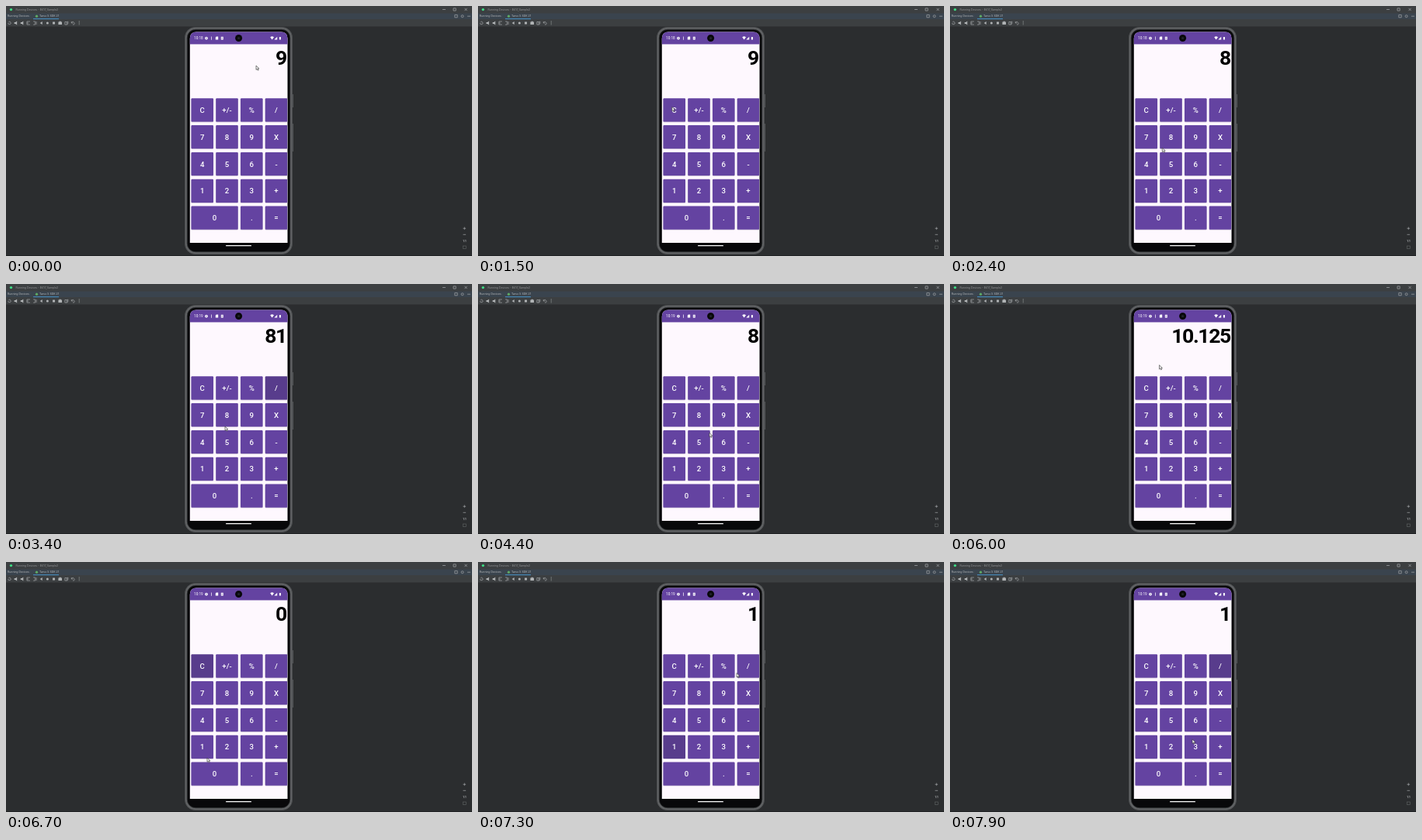
Write an HTML page that moves like this. It is 600 px wide and 323 px high and loops after 8000 ms.

```html
<!DOCTYPE html>
<html lang="en">
<head>
<meta charset="utf-8">
<title>Calculator on a running device</title>
<style>
  html, body { margin: 0; width: 100%; height: 100%; overflow: hidden; background: #2b2d2f; }
  svg { display: block; width: 100vw; height: 100vh; }
  text { font-family: Roboto, sans-serif; }
  .ui text { font-family: Inter, "Open Sans", sans-serif; font-size: 3.5px; fill: #b4b6b8; }
  .line { fill: none; stroke: #a4a7a9; stroke-width: .7; }
  .solid { fill: #b0b3b5; }
  .key { font-size: 9.6px; font-weight: 500; fill: #fff; text-anchor: middle; }
  #display { font-size: 26.5px; font-weight: 700; letter-spacing: -.05em; text-anchor: end; }
</style>
</head>
<body>
<svg viewBox="0 0 600 323">
  <clipPath id="screen"><path d="M236.8 306V42q0-8.5 8.5-8.5h108.7q8.5 0 8.5 8.5v264z"/></clipPath>

  <!-- Tool window -->
  <g class="ui">
    <rect width="600" height="323" fill="#2b2d2f"/>
    <rect width="600" height="26.5" fill="#3c3f41"/>
    <rect y="9.5" width="600" height="7.5" fill="#3a444e"/>
    <rect x="35" y="16" width="33" height="1.2" fill="#4587b5"/>
    <rect y="322" width="600" height="1" fill="#202224"/>
    <circle cx="6.5" cy="4.6" r="1.7" fill="#3ddc84"/>
    <text x="12.5" y="5.8" style="fill:#929496">Running Devices - B417_Sample2</text>
    <text x="2" y="14.4">Running Devices:</text>
    <circle cx="39.5" cy="13.2" r="1.6" fill="#5fad65"/>
    <text x="43" y="14.4">Tarvo 5 SDK 21</text>
    <path class="line" d="M562 4.5h4m10-1.6h3.2v3.2H576zm14.5 0l3.2 3.2m0-3.2l-3.2 3.2"/>
    <path class="line" d="M577.8 11.4h3.4v3.4h-3.4zm16.2 1.8h4"/>
    <circle class="line" cx="587.6" cy="13.2" r="1.5"/>
    <g id="toolbar"></g>
    <path class="line" d="M588.5 287.3h3.6m-1.8-1.8v3.6m-1.8 6.2h3.6"/>
    <text x="590.3" y="304.5" text-anchor="middle" font-weight="700">1:1</text>
    <rect class="line" x="588.3" y="310" width="4" height="3.6" stroke-opacity=".4"/>
  </g>

  <!-- Phone -->
  <path d="M369 114v17m0 21v36" stroke="#55575a" stroke-width="2"/>
  <rect x="230.5" y="27.5" width="138" height="293" rx="13" fill="#606264" stroke="#4c4e50"/>
  <rect x="233.2" y="30.2" width="132.6" height="287.6" rx="11" fill="#08080a" stroke="#343638" stroke-width=".8"/>
  <g clip-path="url(#screen)">
    <rect x="236" y="33" width="128" height="274" fill="#fef8fe"/>
    <rect x="236" y="33" width="128" height="16.4" fill="#6443a1"/>
    <g id="keys"></g>
  </g>
  <rect x="283" y="309" width="33" height="1.3" rx=".65" fill="#fff"/>
  <circle cx="299.6" cy="41.5" r="4.5" fill="#08080a"/>
  <circle cx="299.6" cy="41.5" r="1.6" fill="#20242b"/>
  <g fill="#fff">
    <text id="clock" x="242" y="43.2" font-size="4.7"></text>
    <circle cx="258" cy="41.6" r="1.9"/>
    <path d="M264.3 39.5h.7v4.2h-.7zm6.5 0h2.4v4h-3.4v-3zm6 .2h3v3.7h-3z"/>
    <path d="M340.2 40.2q2.4-1.8 4.8 0l-2.4 3.3zm9-.5v3.8h-3.8zm2.7.2h2v3.6h-2z"/>
  </g>
  <path d="M257.2 41.6h1.6m18.7 0h1.6" stroke="#6443a1" stroke-width=".7"/>
  <text id="display" x="361" y="76.3"></text>
  <path id="cursor" d="M0 0v5.4l1.3-1.1.9 1.9 1-.5-.9-1.8h1.7z" fill="#eee" stroke="#333" stroke-width=".6"/>
</svg>
<script>
const LOOP = 8000, STEP = 100, MOVE = 450, PRESS_DELAY = 100, HOLD = 400, FADE = 100;
const $ = id => document.getElementById(id);

// Pointer stops: arrival time, key label or resting point, display after pressing.
const stops = [
  [0, [322, 77]], [400, [379, 92]], [700, [361, 88]],
  [1500, 'C', '0'], [1800, '8', '8'], [2700, '1', '81'], [3000, '/', '81'],
  [3400, [282, 184]], [3500, '8', '8'], [4700, '=', '10.125'], [5100, [297, 69]],
  [6200, 'C', '0'], [6700, [259, 253]], [6900, '1', '1'], [7400, '/', '1'], [7900, [312, 229]]
];
const presses = stops.filter(stop => stop[2])
  .map(([at, label, shown]) => ({ at: at + PRESS_DELAY, label, shown }));
const keyRows = ['C +/- % /', '7 8 9 X', '4 5 6 -', '1 2 3 +', '0  . ='];
const keys = {};

// Toolbar icons, each drawn around its own centre.
const speaker = 'M-2-1h1.5l2-1.4v4.8l-2-1.4H-2z';
const toolbar = [
  ['line', 'M-1.7 0a1.7 1.7 0 1 0 .5-1.2'], ['solid', speaker], ['solid', speaker],
  ['line', 'M2-2h-4v4h4M-2 0h2'], ['line', 'M-2-2h2.5v4H-2M2-2v4'],
  ['solid', 'M1.5-2v4l-3-2z'], ['solid', 'M-1.5 0a1.5 1.5 0 1 0 3 0a1.5 1.5 0 1 0-3 0'],
  ['solid', 'M-1.5-1.5h3v3h-3z'], ['solid', 'M-2.3-1.5h1l.5-.8H.8l.5.8h1v3.6h-4.6z'],
  ['line', 'M-2-1.5H.5V2H-2zM.5-1L2-2v3L.5 2'], ['line', 'M-1.7-2v2h2m-2-.5q2-2.5 3.5 0T0 2'],
  ['solid', 'M-.4-2.4h.9v.9h-.9zm0 1.9h.9v.9h-.9zm0 1.9h.9v.9h-.9z']
];

function add(parent, tag, attributes, content = '') {
  const node = document.createElementNS('http://www.w3.org/2000/svg', tag);
  for (const name in attributes) node.setAttribute(name, attributes[name]);
  node.textContent = content;
  return parent.appendChild(node);
}

toolbar.forEach(([style, d], i) =>
  add($('toolbar'), 'path', { class: style, d, transform: `translate(${4.5 + i * 8.15} 22)` }));

keyRows.forEach((row, r) => row.split(' ').forEach((label, c) => {
  if (!label) return;
  const x = 238.5 + c * 31.75, y = 119.2 + r * 34.85;
  const width = label === '0' ? 60.2 : 28.5, height = 30.2;
  add($('keys'), 'rect', { x: x - .2, y: y + .8, width: width + .4, height, rx: 1.3, fill: '#c9bfd6' });
  const face = add($('keys'), 'rect', { x, y, width, height, rx: 1 });
  add($('keys'), 'text', { class: 'key', x: x + width / 2, y: y + 18.6 }, label);
  keys[label] = { face, tip: [x + width / 2 - 3, y + height / 2 - 4] };
}));

const clamp = v => Math.min(1, Math.max(0, v));
const ease = p => p * p * (3 - 2 * p);
const tipOf = place => keys[place]?.tip ?? place;

function pointerAt(t) {
  const next = stops.findIndex(([at]) => at > t);
  if (next < 0) return tipOf(stops.at(-1)[1]);
  const [left, from] = stops[next - 1], [arrival, to] = stops[next];
  const duration = Math.min(MOVE, arrival - left);
  const p = ease(clamp(1 - (arrival - t) / duration));
  const end = tipOf(to);
  return tipOf(from).map((v, i) => v + (end[i] - v) * p);
}

function keyColor(label, t) {
  const press = presses.findLast(p => p.label === label && p.at <= t);
  const shade = press ? clamp((press.at + HOLD + FADE - t) / FADE) : 0;
  return `rgb(${100 - 12 * shade},${67 - 7 * shade},${161 - 21 * shade})`;
}

function draw(now) {
  const t = Math.floor(now % LOOP / STEP) * STEP;
  $('display').textContent = presses.findLast(p => p.at <= t)?.shown ?? '9';
  $('clock').textContent = t < 2800 ? '10:18' : '10:19';
  $('cursor').setAttribute('transform', `translate(${pointerAt(t)})`);
  for (const label in keys) keys[label].face.setAttribute('fill', keyColor(label, t));
  requestAnimationFrame(draw);
}
requestAnimationFrame(draw);
</script>
</body>
</html>
```
